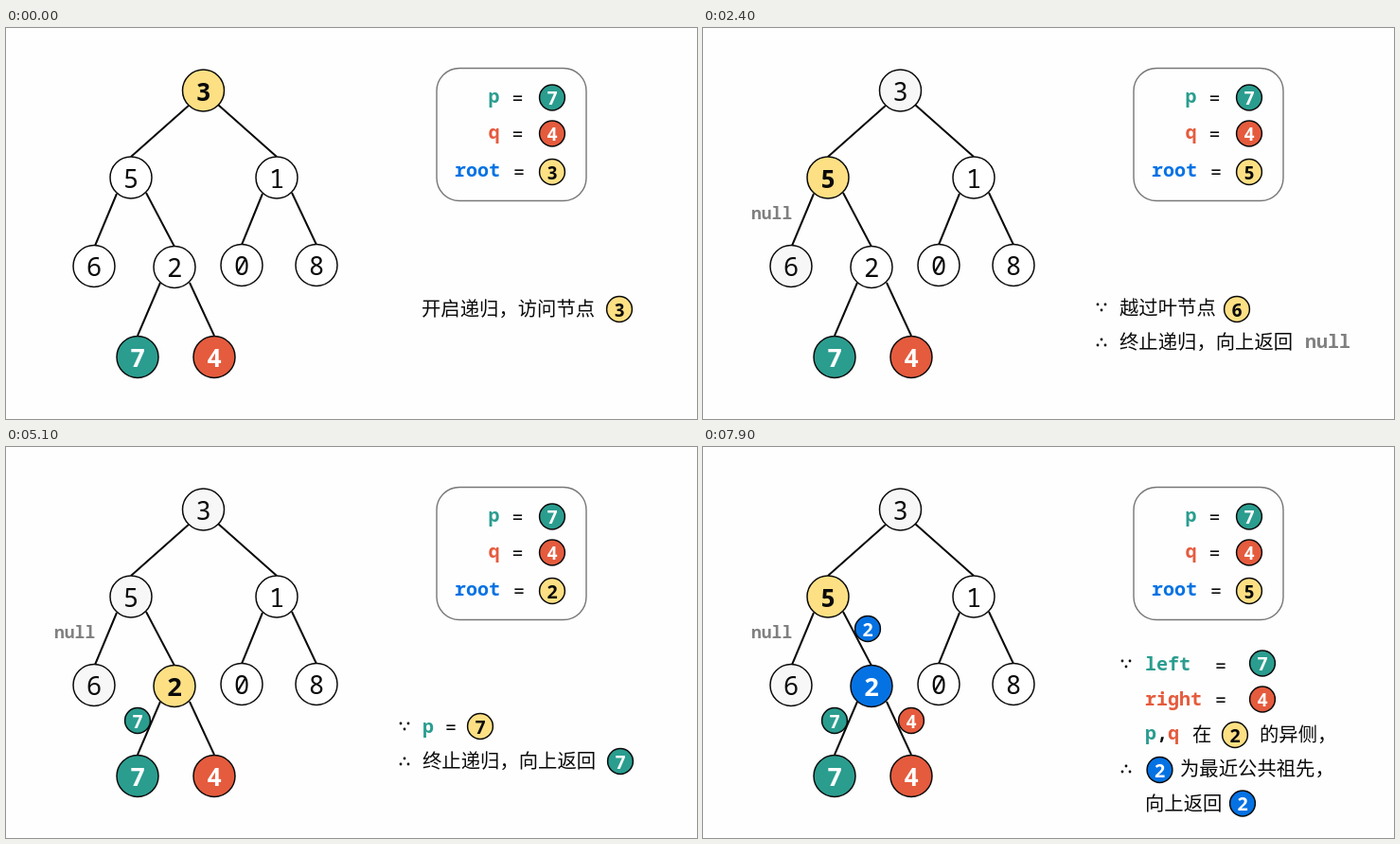
These frames come from a looping animation (730x413 px, 8000 ms). An HTML page with a canvas:

```html
<!DOCTYPE html>
<html lang="zh-CN">
<head>
<meta charset="utf-8">
<title>Lowest common ancestor</title>
<style>
html, body { margin: 0; width: 100%; height: 100%; overflow: hidden; background: #fefefe; }
canvas { display: block; width: 730px; height: 413px; }
</style>
</head>
<body>
<canvas id="stage" width="730" height="413"></canvas>
<script>
const ctx = document.getElementById('stage').getContext('2d');
const LOOP = 8000;
const MONO = '"Noto Sans Mono", "DejaVu Sans Mono", monospace';
const CJK = '"Noto Sans CJK SC", "Noto Sans CJK", sans-serif';
const INK = '#0a0a0a', YELLOW = '#fde084', GREEN = '#2a9d8f', RED = '#e55b3d',
      BLUE = '#0572e3', GREY = '#808080', SEEN = '#f7f7f7', WHITE = '#ffffff';

const nodes = {
  3: [208.5, 66], 5: [132, 158], 1: [286, 158], 6: [93, 251.5], 2: [178, 252.5],
  0: [249, 250.5], 8: [328, 250.5], 7: [139, 347.5], 4: [220, 347.5]
};
const edges = [
  [194, 81, 132, 136], [224, 81, 286, 136], [117, 175, 94, 230], [148, 174, 178, 231],
  [271, 175, 249, 229], [302, 174, 328, 229], [163, 269, 139, 325], [194, 269, 220, 325]
];
const badges = { 7: [139, 289], 4: [220, 289], 2: [174, 192] };
const fixed = { 7: GREEN, 4: RED };

function text(str, x, y, color = INK, size = 20, weight = 700, family = MONO, align = 'left') {
  ctx.font = `${weight} ${size}px ${family}`;
  ctx.textAlign = align;
  ctx.fillStyle = color;
  ctx.fillText(str, x, y);
}

// Chinese text, centred vertically on y
const han = (str, x, y) => text(str, x, y + 7.5, INK, 20.35, 400, CJK);
const equals = (x, y) => text('=', x, y + 7.5, INK, 20, 500, MONO, 'center');

function disc(digit, x, y, fill, r, size) {
  ctx.beginPath();
  ctx.arc(x, y, r, 0, Math.PI * 2);
  ctx.fillStyle = fill;
  ctx.fill();
  ctx.lineWidth = 1.5;
  ctx.strokeStyle = INK;
  ctx.stroke();
  const plain = fill === WHITE || fill === SEEN;
  const color = plain || fill === YELLOW ? INK : WHITE;
  text(digit, x, y + size * 0.357 + r / 22, color, size, plain ? 400 : 800, MONO, 'center');
}
const node = (digit, fill) => disc(digit, ...nodes[digit], fill, 22, 27);
const chip = (digit, x, y, fill) => disc(digit, x, y, fill, 13.4, 19.5);

// "because" points down (dir 1), "therefore" points up (dir -1)
function dots(x, y, dir) {
  ctx.fillStyle = INK;
  for (const [dx, dy] of [[-4, -3], [4, -3], [0, 3]]) {
    ctx.beginPath();
    ctx.arc(x + dx, y + dy * dir, 1.4, 0, Math.PI * 2);
    ctx.fill();
  }
}

function visit(digit, parent, side) {
  han((parent ? '向下' : '开启') + '递归，访问节点', 439, 296.5);
  chip(digit, 648, 297, YELLOW);
  if (!parent) return;
  han('（即', 431.5, 340);
  chip(parent, 497.5, 340.5, WHITE);
  han(`的${side}子节点`, 523, 340);
  han('）', 636.5, 340);
}

function goBack() {
  dots(421, 295, 1);
  dots(421, 332, -1);
  han('终止递归，向上返回', 440, 331);
}

function leaf() {
  goBack();
  han('越过叶节点', 440, 295);
  chip(6, 564, 297, YELLOW);
  text('null', 636, 338, GREY);
}

function found(name, digit, color) {
  goBack();
  text(name, 440, 302, color);
  equals(470, 295);
  chip(digit, 501, 295, YELLOW);
  chip(digit, 649, 332, fixed[digit]);
}

function conclude() {
  dots(447, 229, 1);
  text('left', 467, 236, GREEN);
  equals(547, 230);
  chip(7, 591, 228.5, GREEN);
  text('right', 467, 273, RED);
  equals(547, 266);
  chip(4, 591, 266.5, RED);
  text('p', 467, 309, GREEN);
  text(',', 479, 309);
  text('q', 491, 309, RED);
  han('在', 517, 303);
  chip(2, 562, 304, YELLOW);
  han('的异侧，', 588, 303);
  dots(447, 340, -1);
  chip(2, 482.5, 341, BLUE);
  han('为最近公共祖先，', 504, 339);
  han('向上返回', 467, 376);
  chip(2, 570, 376.5, BLUE);
}

const steps = [
  { at: 0, root: 3, seen: [], note: () => visit(3) },
  { at: 500, root: 5, seen: [3], note: () => visit(5, 3, '左') },
  { at: 1500, root: 6, seen: [3, 5], note: () => visit(6, 5, '左') },
  { at: 2400, root: 5, seen: [3, 6], note: leaf },
  { at: 3300, root: 2, seen: [3, 5, 6], note: () => visit(2, 5, '右') },
  { at: 4200, root: 7, seen: [3, 5, 6, 2], note: () => visit(7, 2, '左') },
  { at: 5100, root: 2, seen: [3, 5, 6], back: [7], note: () => found('p', 7, GREEN) },
  { at: 6000, root: 4, seen: [3, 5, 6, 2], back: [7], note: () => visit(4, 2, '右') },
  { at: 6900, root: 2, seen: [3, 5, 6], back: [7, 4], note: () => found('q', 4, '#c4331c') },
  { at: 7900, root: 5, seen: [3, 6], back: [7, 4, 2], note: conclude }
];

function drawTree({ at, root, seen, back = [] }) {
  ctx.strokeStyle = INK;
  ctx.lineWidth = 2;
  ctx.beginPath();
  for (const [x1, y1, x2, y2] of edges) {
    ctx.moveTo(x1, y1);
    ctx.lineTo(x2, y2);
  }
  ctx.stroke();
  for (const d of Object.keys(nodes).map(Number)) {
    const base = fixed[d] || (back.includes(d) ? BLUE : seen.includes(d) ? SEEN : WHITE);
    node(d, d === root ? YELLOW : base);
  }
  for (const d of back) chip(d, ...badges[d], fixed[d] || BLUE);
  if (at >= 2400) text('null', 51, 201.5, GREY, 18);
}

function drawPanel(root) {
  ctx.beginPath();
  ctx.roundRect(455, 42.5, 158, 140, 24);
  ctx.strokeStyle = '#777';
  ctx.lineWidth = 1.4;
  ctx.stroke();
  text('p', 509.5, 79, GREEN);
  text('q', 509.5, 117, RED);
  text('root', 474, 157, BLUE);
  equals(540.5, 73.5);
  equals(540.5, 111);
  equals(542, 151);
  chip(7, 577, 73.5, root === 7 ? YELLOW : GREEN);
  chip(4, 577, 111.5, root === 4 ? YELLOW : RED);
  chip(root, 577, 152, YELLOW);
}

function frame(now) {
  const t = now % LOOP;
  const step = steps.findLast(s => s.at <= t) || steps[0];
  ctx.fillStyle = '#fefefe';
  ctx.fillRect(0, 0, 730, 413);
  drawTree(step);
  drawPanel(step.root);
  step.note();
  requestAnimationFrame(tick);
}

let start;
function tick(now) {
  start ??= now;
  frame(now - start);
}
requestAnimationFrame(tick);
</script>
</body>
</html>
```
